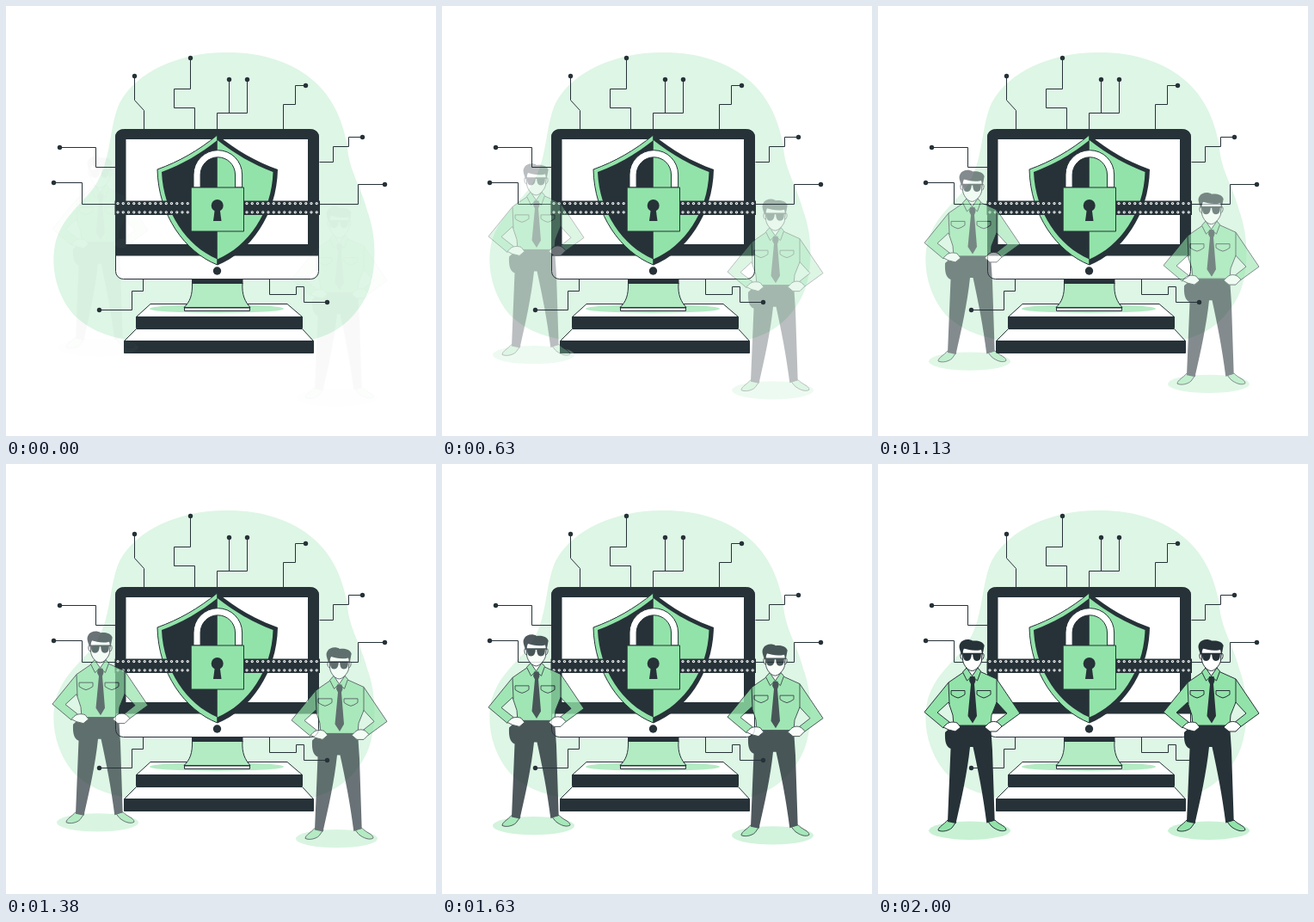
An HTML page for the animation above (2040 ms loop, 500 by 500 pixels).

```html
<!DOCTYPE html>
<html lang="en">
<head>
<meta charset="utf-8">
<title>Guarded computer</title>
<style>
  html, body { margin: 0; width: 100%; height: 100%; overflow: hidden; background: #fff; }
  svg { display: block; width: 100%; height: 100%; }
  .dark { fill: #263238; }
  .green { fill: #92e3a9; }
  .soft { fill: #b3ebc3; }
  .pale { fill: #def6e5; }
  .white { fill: #fff; }
  .line { stroke: #263238; stroke-width: 1; stroke-linejoin: round; }
  .open { fill: none; }
</style>
</head>
<body>
<svg viewBox="0 0 500 500">
  <defs>
    <g id="guard">
      <ellipse cx="106.5" cy="426.3" rx="47.5" ry="10.7" fill="#c8f1d4"/>
      <path class="green line" d="M81 414C77 419 70 422 70 426C75 428.500 83 426 86 423L91 416ZM128 416L136 414C140 419 149 421 149 425.500C145 428.500 137 425.500 132 421Z"/>
      <path class="dark" d="M88 303H131L133 333L135.700 414.500L126.300 417.500C122.500 386 116 354 110.500 329H107C104 358 97 390 90.500 418L81 416L84.500 331C79 329 77.500 322 78 312Z"/>
      <path class="green line" d="M101 241L82 254L54 288.500L76 307L83 300L69 289L82 277L87 292L88 304H131L132 292L138 277L150 290L136 301L143 306L165 290L138 250L118 241Z"/>
      <path class="open line" d="M82 254L83 279M138 250L138 278"/>
      <path class="white line" d="M79 303C83 299 89 300 92 301L96 306L90 311L82 309L76 306ZM140 301C135 298 130 300 128 302L124 306L130 311L138 311L144 305Z"/>
      <path class="white line" d="M103 234V240L109.500 248L116 240V234Z"/>
      <path class="green line" d="M103 237L98.500 242L103.500 252L109.500 246.500L115.500 252L119.500 241L116 237L109.500 246.500Z"/>
      <path class="dark" d="M107 247H112.500L113.500 252L112 256L115 293L110 301.500L104.500 293L108 256L106 252Z"/>
      <path id="pocket" class="green line" d="M85 263.500H101V268L97 270.500L93 272L89 270.500L85 268Z"/>
      <use href="#pocket" x="30"/>
      <path class="white line" d="M98 220C95 219 95 227 99 228ZM121 220C124 219 124 227 120 228Z"/>
      <path class="white line" d="M98 214H121.500L120.500 229C119 235 113 240.500 109.500 240.500C105 240.500 100 235 98.700 229Z"/>
      <path class="dark" d="M97 222C96 217 93 213 95.500 208.500C98 204 105 202.500 110 205.500C116 205 122 206 123.700 211C123 214 122.500 218 121.700 221L120 216C112 218 105 216 100 214.500Z"/>
      <path class="dark" d="M97 219.800H122V221.300H119.800C120 226.500 118 229 115 229C111.500 229 110.500 226 110.200 221.500H108.800C108.500 226 107 229 103.500 229C100 229 99 226 99 221.300H97Z"/>
    </g>
  </defs>

  <path class="pale" d="M258 54C205 53 152 75 132 113C120 139 123 174 107 203C97 224 68 240 58 273C51 301 58 334 77 357C94 376 118 384 140 388H355C389 381 412 356 422 330C431 304 431 267 420 238C414 214 402 196 398 173C395 143 384 111 360 89C333 64 296 54 258 54Z"/>

  <g id="circuits" transform="translate(.5 .5)"></g>

  <g id="platform">
    <path class="dark line" d="M151.500 361.500H344.500V374.500H151.500ZM137.500 389.500H357.500V403.500H137.500Z"/>
    <path class="white line" d="M168 346.500H327L344.500 361.500H151.500ZM151.500 375.500H344.500L357.500 389.500H137.500Z"/>
    <ellipse class="soft" cx="245" cy="352" rx="78" ry="5"/>
    <path class="soft line" d="M216.500 322H275C274 336 278 344 284 350.500H207C214 344 217 336 216.500 322Z"/>
    <path class="dark" d="M216 317H275.500V323H216Z"/>
    <path class="white line" d="M207.500 351H283.500V354.500H207.500Z"/>
  </g>

  <g id="monitor">
    <rect class="white line" x="127.500" y="143.500" width="236" height="174" rx="9"/>
    <path class="dark" d="M127 290.500V153Q127 143.500 137 143.500H354Q364 143.500 364 153V290.500Z"/>
    <rect class="white" x="139.500" y="155" width="211.500" height="122"/>
    <circle class="dark" cx="245.500" cy="308" r="4.700"/>
  </g>

  <g id="shield">
    <path class="green line" d="M245.800 150C224 168 201 181 176 190C177 243 208 286 245.800 301Z"/>
    <path class="dark" d="M245.800 149.500C267 168 291 181 316 190C315 243 284 286 245.800 301.500Z"/>
    <path class="dark" d="M245.800 156C226 172 205 184 181 193C183 240 210 279 245.800 294.500Z"/>
    <path class="green" d="M245.800 156C266 172 287 184 310.500 193C309 240 282 279 245.800 294.500Z"/>
  </g>

  <g id="chain">
    <path class="dark" d="M126.500 226.500H215V243H126.500ZM277 226.500H365V243H277Z"/>
  </g>

  <g id="lock">
    <path class="white line" d="M218 211V196a28.300 28.300 0 0 1 56.600 0V211H266.500V196a20.200 20.200 0 0 0-40.400 0V211Z"/>
    <rect class="green line" x="215.200" y="211" width="61.300" height="51"/>
    <circle class="dark" cx="245.700" cy="232" r="7"/>
    <path class="dark" d="M243 235H248.500L250.500 250H241Z"/>
  </g>

  <use class="guard" href="#guard"/>
  <use class="guard" href="#guard"/>
</svg>
<script>
const LOOP = 2040, STEP = 1000 / 24, LAST = 48, TRAVEL = 30, SPACING = 278;
const [left, right] = document.querySelectorAll(".guard");

function add(parent, tag, attrs) {
  const node = document.createElementNS("http://www.w3.org/2000/svg", tag);
  for (const key in attrs) node.setAttribute(key, attrs[key]);
  document.getElementById(parent).append(node);
}

// Each wire starts at its round terminal.
const wires = [
  "149 81V109L160 121V143", "214 60V96H195V118H219V143",
  "259 85V124", "280 85V124H245V150", "348 92H336V114H322V143",
  "414 152H398V163H380V181H364", "440 207H409V230H364",
  "62 164H104V187H127", "55 205H88V230H127",
  "108 353H146V331H159V317", "373 344H346V326H337V335H306V317"
];
for (const wire of wires) {
  const [cx, cy] = wire.match(/\d+/g);
  add("circuits", "path", { d: "M" + wire, class: "line open" });
  add("circuits", "circle", { cx, cy, r: 2.7, class: "dark" });
}

for (const start of [130, 280]) {
  for (let i = 0; i < 14; i++) {
    for (const cy of [229.6, 239.8]) {
      const cx = start + i * 6.25;
      add("chain", "circle", { cx, cy, r: 1.6, class: "white" });
      add("chain", "circle", { cx, cy, r: .6, class: "dark" });
    }
  }
}

function draw(time) {
  const step = Math.min(LAST, Math.floor((time % LOOP + 5) / STEP));
  const progress = step < 3 ? 0.025 : step / LAST;
  const shift = TRAVEL * (1 - progress);
  left.setAttribute("transform", `translate(0 ${-shift})`);
  right.setAttribute("transform", `translate(${SPACING} ${shift})`);
  for (const guard of [left, right]) guard.setAttribute("opacity", progress);
}

const begin = performance.now();
function tick() {
  draw(performance.now() - begin);
  requestAnimationFrame(tick);
}
tick();
</script>
</body>
</html>
```
